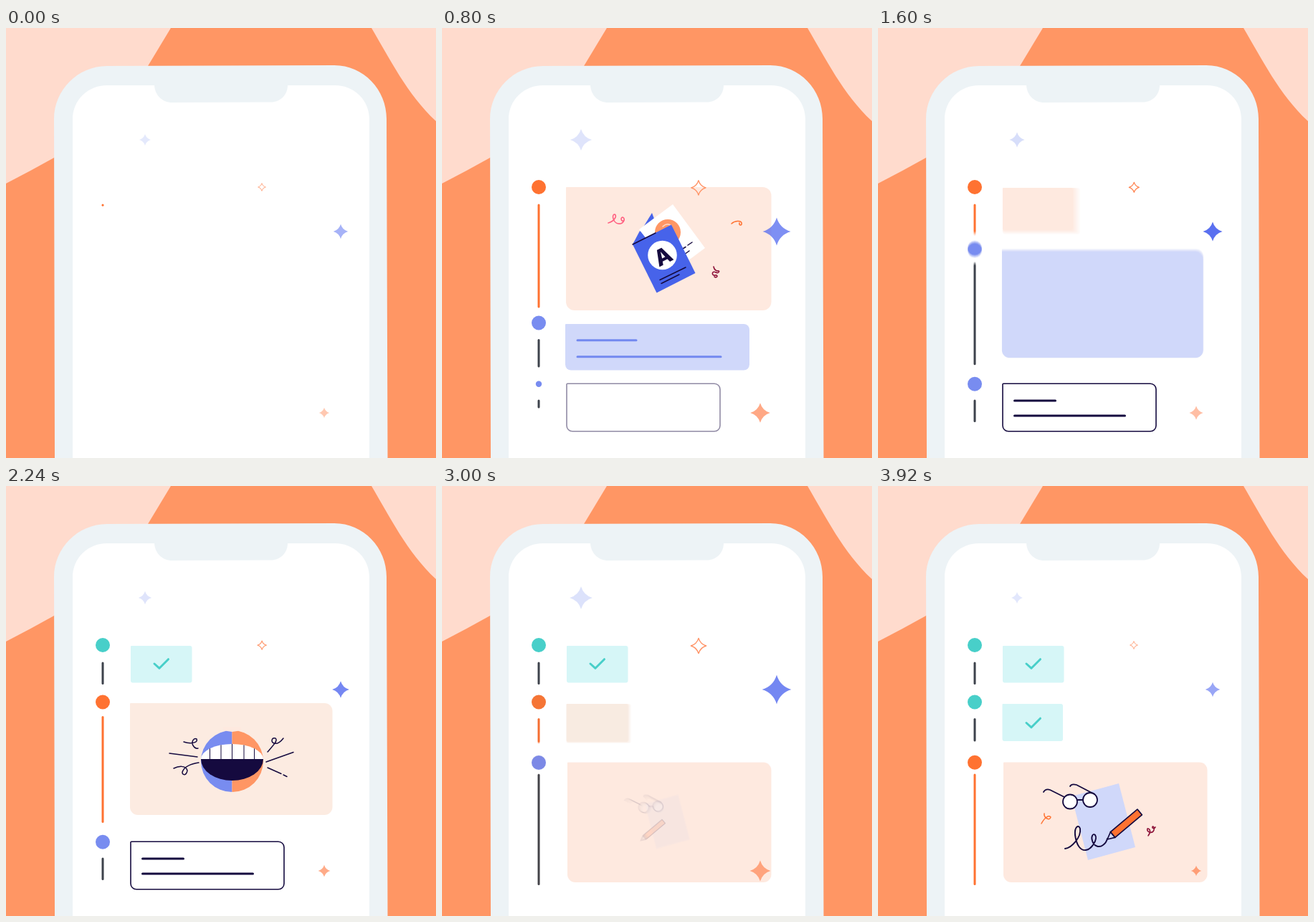
Recreate the animation shown at these times as an HTML page with a canvas. Size 600 by 600 pixels, loop 3960 ms.

```html
<!DOCTYPE html>
<html lang="en">
<head>
<meta charset="utf-8">
<title>Checklist on a phone</title>
<style>
html, body { margin: 0; width: 100%; height: 100%; overflow: hidden; background: #ff9664; }
canvas { display: block; width: 600px; height: 600px; }
</style>
</head>
<body>
<canvas id="stage" width="600" height="600"></canvas>
<script>
const LOOP = 3960;
const NAVY = '#150a3f', ORANGE = '#ff7231', BLUE = '#788cf0', TEAL = '#48cfc9', DARK = '#3d424b';
const PEACH = '#fee9df', LILAC = '#d0d8fa', MINT = '#d6f6f7', SOFT = '#ff9664';

const out = document.getElementById('stage').getContext('2d');
const layer = document.createElement('canvas');
layer.width = layer.height = 600;
const c = layer.getContext('2d');

// Timing helpers
const ramp = (t, a, b) => Math.min(1, Math.max(0, (t - a) / (b - a)));
const ease = u => (1 - Math.cos(Math.PI * u)) / 2;
const move = (t, a, b) => ease(ramp(t, a, b));
const pop = (t, a, b) => 1 - (1 - ramp(t, a, b)) ** 3;
const lerp = (a, b, u) => a + (b - a) * u;
const mix = (a, b, u) => a.map((v, i) => lerp(v, b[i], u));
const track = (t, keys) => {
  for (let i = 1; i < keys.length; i++) {
    const [t0, v0] = keys[i - 1], [t1, v1] = keys[i];
    if (t <= t1) return lerp(v0, v1, ramp(t, t0, t1));
  }
  return keys[keys.length - 1][1];
};
const rgb = h => [1, 3, 5].map(i => parseInt(h.substr(i, 2), 16));
const blend = (a, b, u) => `rgb(${mix(rgb(a), rgb(b), u).map(Math.round)})`;

// Drawing helpers
const fill = (d, color) => { c.fillStyle = color; c.fill(new Path2D(d)); };
const stroke = (d, color, w = 1.6) => {
  c.strokeStyle = color;
  c.lineWidth = w;
  c.stroke(new Path2D(d));
};
const disc = (x, y, r, color) => {
  if (r <= 0) return;
  c.beginPath();
  c.arc(x, y, r, 0, 7);
  c.fillStyle = color;
  c.fill();
};
const group = (alpha, x, y, scale, draw) => {
  if (alpha <= 0 || scale <= 0) return;
  c.save();
  c.globalAlpha *= alpha;
  c.translate(x, y);
  c.scale(scale, scale);
  c.translate(-x, -y);
  draw();
  c.restore();
};
const rail = (y0, y1, color) => stroke(`M135 ${y0 + 1.5}V${Math.max(y0 + 1.7, y1 - 1.5)}`, color, 3);
const bar = (x0, x1, y, u, color) => { if (u > 0) stroke(`M${x0} ${y}H${lerp(x0 + .1, x1, u)}`, color, 3); };
const card = ([x0, y0, x1, y1, r]) => {
  const p = new Path2D();
  p.roundRect(x0, y0, x1 - x0, y1 - y0, [1, r, r, r]);
  return p;
};
const tick = y => stroke(`M207 ${y}l7 6.3L226.500 ${y - 6.300}`, TEAL, 3);

function phone() {
  c.fillStyle = SOFT;
  c.fillRect(0, 0, 600, 600);
  fill('M0 0H230L198 53L150 130L67 181Q35 199 0 217Z', '#ffdbcd');
  fill('M510 0C535 42 560 93 600 130V0Z', '#ffdbcd');
  fill('M68 600L67 127C67 87 100 53 141 53L458 52C499 52 531 86 531 127L532.500 600Z', '#edf3f6');
  fill('M93 600V127C93 101 114 80 141 80H207C208 94 218 104 232 104L369 103.500C383 103.500 393 93 393 80H459C486 80 507 101 507 127V600Z', '#fff');
}

function booklet() {
  fill('M266 302L293 258L305 290Z', '#4763ea');
  fill('M275 281L322 246L367 307L320 342Z', '#fff');
  fill('M266 302L276 283L286 295Z', '#4763ea');
  disc(315, 285, 18, SOFT);
  stroke('M308 277Q314 271 320 276', '#ffdbcd', 1.5);
  stroke('M336 308l4-2.500M343 303l6-4M338 316l7-5', NAVY, 1.5);
  fill('M266 302L320 274.500L353.500 342L299.500 369.500Z', '#4763ea');
  stroke('M266 302L298 286M304 351.500L340 334M306 356.500L331 344', NAVY, 1.5);
  disc(307.500, 317, 20.300, '#fff');
  c.save();
  c.translate(308.500, 318.500);
  c.rotate(-.47);
  c.fillStyle = NAVY;
  c.font = '800 31px Inter, sans-serif';
  c.textAlign = 'center';
  c.fillText('A', 0, 11);
  c.restore();
}

function bookArt(t) {
  const off = 1 - ramp(t, 1200, 1290);
  group(off * ramp(t, 360, 440), 310, 308, lerp(.5, 1, pop(t, 360, 640)), booklet);
  const s = pop(t, 520, 740);
  group(off, 243, 267, s, () => stroke('M232 272C240 270 245 262 241 260C236 260 239 272 246 273C253 274 257 266 252 264C248 265 251 272 254 268', '#ff5f80'));
  group(off, 411, 271, s, () => stroke('M404 273C408 269 417 268 418 272C419 276 414 276 415 272', ORANGE));
  group(off, 382, 341, s, () => stroke('M379 333Q380 338 384 339C389 338 386 343 382 341C376 338 376 346 381 345C386 344 384 350 380 347', '#8d1238'));
}

function mouth(open) {
  const lip = 381 - 21 * open, low = 381 + 30 * open;
  fill('M315.500 341A43.500 43 0 0 0 315.500 427Z', BLUE);
  fill('M315.500 341A43.500 43 0 0 1 315.500 427Z', SOFT);
  fill('M303 340Q315.500 346 328 340V336H303Z', PEACH);
  c.save();
  c.clip(new Path2D(`M272 381A43.500 ${381 - lip} 0 0 1 359 381Z`));
  c.fillStyle = '#fff';
  c.fillRect(270, 355, 92, 27);
  stroke('M284.500 358V381M300 358V381M315.500 358V381M332 358V381M346.500 358V381', NAVY, 1);
  c.restore();
  fill(`M272 381H359A43.500 ${low - 381} 0 0 1 272 381Z`, NAVY);
}

function mouthArt(t) {
  const off = 1 - ramp(t, 2480, 2580);
  group(off * ramp(t, 1720, 1800), 315.500, 384, lerp(.5, 1, pop(t, 1720, 1960)), () => mouth(lerp(.15, 1, move(t, 1780, 2060))));
  const s = pop(t, 1900, 2140);
  group(off * ramp(t, 1880, 1960), 315.500, 381, lerp(.75, 1, s), () => {
    stroke('M248 357C256 360 269 359 266 353C262 351 258 357 261 362Q264 367 268 366M228 373L267 378M234 394C240 391 251 389 253 397C252 406 243 403 247 397Q251 389 269 386', NAVY, 1.5);
    stroke('M365 371C372 363 380 355 376 352C371 350 369 357 374 359Q380 361 387 352M363 385L401 371.500M365 393L384 401.500M387 403L392 405.500', NAVY, 1.5);
  });
}

const SCRIBBLE = 'M261 506C270 505 284 490 282 478C280 472 274 475 275 487C277 502 283 509 290 508C298 507 307 493 303 487C300 484 297 489 299 495C301 503 309 505 314 501C317 499 319 496 320 492';
const probe = document.createElementNS('http://www.w3.org/2000/svg', 'path');
probe.setAttribute('d', SCRIBBLE);
const inkLength = probe.getTotalLength();

function pencil(x, y) {
  c.save();
  c.translate(x, y);
  c.rotate(-.7);
  stroke('M0 0L10-5V5Z', NAVY, 1.7);
  fill('M10-5H59V5H10Z', ORANGE);
  stroke('M10-5H59V5H10Z', NAVY, 1.7);
  c.restore();
}

function deskArt(t) {
  group(ramp(t, 2990, 3070), 314, 468, lerp(.6, 1, pop(t, 2990, 3200)), () => {
    fill('M270 433L336 415L359 504L293 522Z', LILAC);
    stroke('M231 427Q234 422 240 424L260 434M268 419Q270 415 277 417L302 430M278 438H286', NAVY, 1.8);
    for (const [x, y] of [[268, 440.500], [296, 438]]) {
      disc(x, y, 10, '#fff');
      c.strokeStyle = NAVY;
      c.stroke();
    }
    const ink = track(t, [[3100, 0], [3320, .6], [3660, 1]]);
    if (ink > 0) {
      c.setLineDash([ink * inkLength, 999]);
      stroke(SCRIBBLE, NAVY, 1.9);
      c.setLineDash([]);
    }
    pencil(track(t, [[3100, 262], [3320, 283], [3660, 320]]), track(t, [[3100, 506], [3320, 499.500], [3660, 493]]));
  });
  group(1, 235, 464, pop(t, 3100, 3300), () => stroke('M228 471C233 462 238 459 241 462C240 468 231 463 232 457', ORANGE, 1.5));
  group(1, 381, 481, move(t, 3220, 3420), () => stroke('M377 488C381 483 380 478 376 478C374 483 383 486 385 480C386 474 382 474 383 477Q385 479 387 476', '#8d1238', 1.6));
}

const STARS = [
  { x: 194, y: 156, r: 7.900, color: '#d4dbfa', a: [.62, .75, .92, .75, .75, .9, .65] },
  { x: 357, y: 222, r: 5.300, color: '#ff7c45', line: 1, a: [.55, .8, .95, .75, .8, .9, .55] },
  { x: 467, y: 284, r: 10.200, color: '#5a70f0', a: [.54, .78, 1, .84, .78, .92, .6] },
  { x: 444, y: 537, r: 7.200, color: '#ff8a5a', a: [.47, .74, .55, .72, .75, .72, .8] }
];
const BEATS = [0, 800, 1600, 2240, 2800, 3320, 3960];

function stars(t) {
  const k = 1.5 - .5 * Math.cos(2 * Math.PI * t / (LOOP / 2));
  for (const s of STARS) {
    const r = s.r * k, q = r * .23;
    const d = `M0 ${-r}Q${q} ${-q} ${r} 0Q${q} ${q} 0 ${r}Q${-q} ${q} ${-r} 0Q${-q} ${-q} 0 ${-r}Z`;
    c.save();
    c.globalAlpha = track(t, BEATS.map((b, i) => [b, s.a[i]]));
    c.translate(s.x + (s.line ? k - 1 : 0), s.y + (s.line ? k - 1 : 0));
    if (s.line) stroke(d, s.color, .8 + .3 * k); else fill(d, s.color);
    c.restore();
  }
}

function scene(t) {
  c.lineCap = c.lineJoin = 'round';
  phone();
  const shrink1 = move(t, 1260, 1680), grow2 = move(t, 1245, 1670);
  const shrink2 = move(t, 2615, 3035), grow3 = move(t, 2590, 3010);
  const tint1 = ramp(t, 1620, 1700), tint2 = ramp(t, 3000, 3100);

  // Rails
  rail(245.500, lerp(lerp(248, 390.500, move(t, 0, 400)), 277, shrink1), blend(ORANGE, DARK, tint1));
  if (t >= 500) {
    const top = lerp(lerp(434, 321, grow2), 324, shrink2);
    const end = lerp(lerp(lerp(435, 473.500, move(t, 500, 760)), 470, grow2), 356.500, shrink2);
    rail(top, end, tint2 ? blend(ORANGE, DARK, tint2) : blend(DARK, ORANGE, tint1));
  }
  if (t >= 720) {
    const end = lerp(lerp(520, 550, move(t, 720, 920)), 557, grow3);
    rail(lerp(518.500, 401.500, grow3), end, blend(DARK, ORANGE, tint2));
  }

  // Dots
  disc(135, 222, 10 * pop(t, 20, 240), blend(ORANGE, TEAL, tint1));
  disc(135, lerp(411.500, 301.500, grow2), 10 * pop(t, 340, 540), tint2 ? blend(ORANGE, TEAL, tint2) : blend(BLUE, ORANGE, tint1));
  disc(135, lerp(496.800, 385.800, grow3), 10 * move(t, 720, 900), blend(BLUE, ORANGE, tint2));

  // Cards
  group(ramp(t, 120, 320), 0, 0, 1, () => {
    c.fillStyle = blend(PEACH, MINT, tint1);
    c.fill(card(mix([173, 222, 459.500, 394, 12], [174, 223, 259.500, 274.500, 3], shrink1)));
  });
  group(ramp(t, 400, 600), 0, 0, 1, () => {
    const box = mix([172, 413, 429, 477.500, 8], [173, 303, 455.500, 459, 11], grow2);
    c.fillStyle = tint2 ? blend('#fcebe1', MINT, tint2) : blend(LILAC, '#fcebe1', tint1);
    c.fill(card(mix(box, [173.500, 304, 258, 356, 3], shrink2)));
  });
  const box3 = card(mix([174, 496.200, 388, 562.800, 8], [175, 385.500, 459.500, 553, 11], grow3));
  const swap = ramp(t, 2500, 2620);
  group(swap, 0, 0, 1, () => { c.fillStyle = PEACH; c.fill(box3); });
  group(ramp(t, 730, 880) * (1 - swap), 0, 0, 1, () => {
    c.strokeStyle = NAVY;
    c.lineWidth = 1.6;
    c.stroke(box3);
    bar(190.500, 247.500, 520, move(t, 850, 1000), NAVY);
    bar(190.500, 344.500, 541, move(t, 900, 1080), NAVY);
  });
  group(1 - ramp(t, 1200, 1290), 0, 0, 1, () => {
    bar(189, 271, 435.800, move(t, 500, 660), '#7389f0');
    bar(189, 389, 458.800, move(t, 540, 740), '#7389f0');
  });

  // Contents
  if (t > 360 && t < 1290) bookArt(t);
  if (t > 1720 && t < 2580) mouthArt(t);
  if (t > 2990) deskArt(t);
  group(ramp(t, 1640, 1715), 217, 248, 1, () => tick(248));
  group(ramp(t, 3040, 3140), 217, 330.500, 1, () => tick(330.500));
  stars(t);
}

// Averages several moments while cards travel, giving motion blur
function paint(t) {
  const fast = (t > 1240 && t < 1690) || (t > 2585 && t < 3045);
  const n = fast ? 8 : 1;
  for (let i = 0; i < n; i++) {
    scene(t + (n > 1 ? (i / (n - 1) - .5) * 24 : 0));
    out.globalAlpha = 1 / (i + 1);
    out.drawImage(layer, 0, 0);
  }
}

const start = performance.now();
function frame() {
  paint((performance.now() - start) % LOOP);
  requestAnimationFrame(frame);
}
frame();
</script>
</body>
</html>
```
